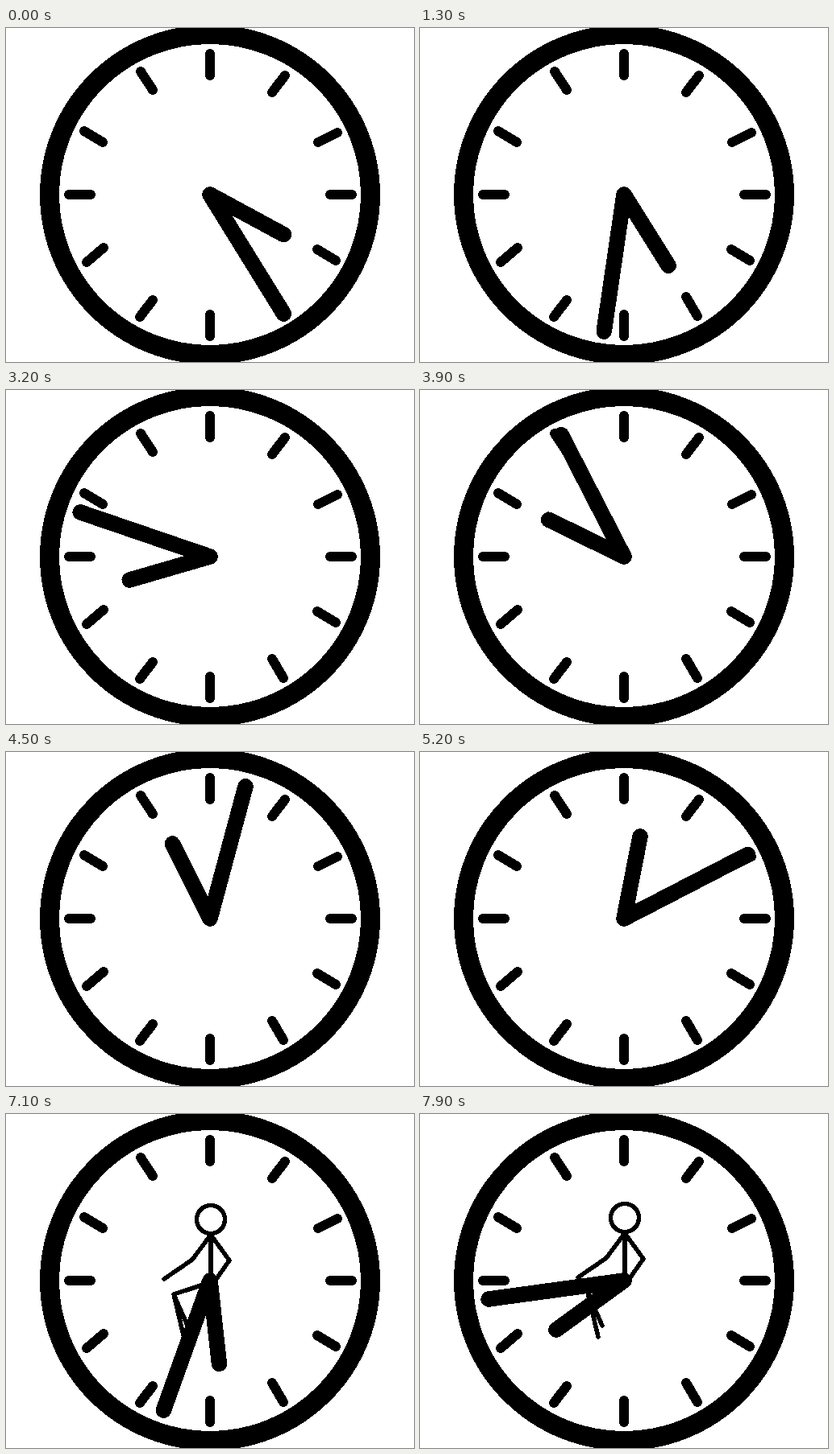
Write an HTML page that moves like this. It is 506 by 415 pixels and loops after 8000 ms.

```html
<!DOCTYPE html>
<html lang="en">
<head>
<meta charset="utf-8">
<title>Clock</title>
<style>
  html, body { margin: 0; width: 100%; height: 100%; overflow: hidden; background: #fff; }
  svg { display: block; width: 100vw; height: 100vh; }
</style>
</head>
<body>
<svg viewBox="0 0 506 415" fill="none" stroke="#000" stroke-linecap="round" stroke-linejoin="round" shape-rendering="crispEdges">
  <rect width="506" height="415" fill="#fff" stroke="none"/>
  <circle cx="253" cy="207" r="199" stroke-width="24"/>
  <path stroke-width="12" d="M253 32V59M346 59L330 80M411 130L387 142M402 207H429M386 275L409 289M330 334L344 358M253 356V383M182 338L166 359M121 273L100 291M78 207H105M97 128L120 142M167 54L182 77"/>
  <g id="figure" stroke-width="5.5">
    <circle cx="254" cy="129" r="17.5"/>
    <path d="M254 148V205M254 148L231 179L196 203M254 148L277 180L258 207M254 207L208 222L226 263M254 207L208 222L221 277"/>
  </g>
  <g stroke-width="19.5">
    <path id="hour"/>
    <path id="minute"/>
  </g>
</svg>
<script>
const LOOP = 8000, STEP = 100, FIGURE_IN = 6800;
const CX = 253, CY = 207, HOUR_LENGTH = 104;

// time, hour angle, minute angle (degrees clockwise from 12), minute length
const keys = [
  [0, 118.5, 148.3, 174],
  [900, 142, 178, 170],
  [1300, 148, 188.3, 172],
  [1800, 172.5, 212.5, 171],
  [2700, 227, 259.5, 170],
  [3200, 253.8, 288.9, 170],
  [3600, 277.5, 311.7, 170],
  [4500, 333.4, 375, 170],
  [5200, 371.1, 422.6, 173],
  [5400, 398, 437.5, 171],
  [6300, 475.3, 509, 172.5],
  [7200, 541, 566, 171],
  [7900, 594, 622.2, 169.5]
];

const byId = id => document.getElementById(id);
const hour = byId('hour'), minute = byId('minute'), figure = byId('figure');

function poseAt(t) {
  const next = Math.max(1, keys.findIndex(k => k[0] >= t));
  const a = keys[next - 1], b = keys[next];
  const p = (t - a[0]) / (b[0] - a[0]);
  return a.map((v, i) => v + (b[i] - v) * p);
}

function setHand(hand, degrees, length) {
  const r = degrees * Math.PI / 180;
  const x = CX + length * Math.sin(r), y = CY - length * Math.cos(r);
  hand.setAttribute('d', `M${CX} ${CY}L${x.toFixed(2)} ${y.toFixed(2)}`);
}

function render(ms) {
  const t = Math.floor(ms % LOOP / STEP) * STEP;
  const [, hourAngle, minuteAngle, minuteLength] = poseAt(t);
  setHand(hour, hourAngle, HOUR_LENGTH);
  setHand(minute, minuteAngle, minuteLength);
  figure.setAttribute('visibility', t >= FIGURE_IN ? 'visible' : 'hidden');
  const drop = 2 * Math.min(1, Math.max(0, (7900 - t) / 700));
  figure.setAttribute('transform', `translate(0 ${drop.toFixed(2)})`);
}

const start = performance.now();
function tick() {
  render(performance.now() - start);
  requestAnimationFrame(tick);
}
tick();
</script>
</body>
</html>
```
